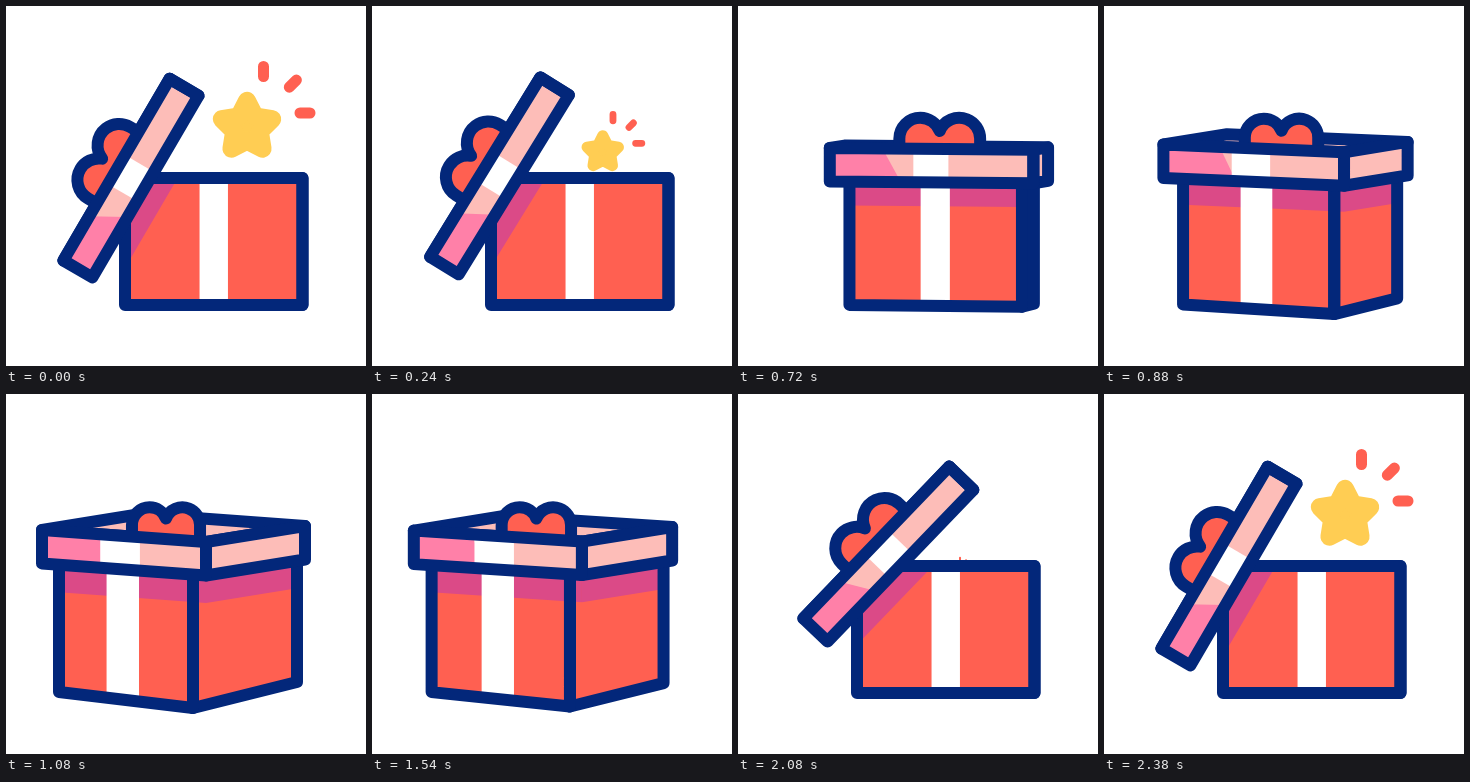
Write an HTML page with a canvas that moves like this. It is 360 by 360 pixels and loops after 2400 ms.

```html
<!DOCTYPE html>
<html lang="en">
<head>
<meta charset="utf-8">
<title>Gift box</title>
<style>
html, body { margin: 0; width: 100%; height: 100%; overflow: hidden; background: #fff; }
canvas { display: block; width: 360px; height: 360px; }
</style>
</head>
<body>
<canvas id="stage" width="360" height="360"></canvas>
<script>
const ctx = document.getElementById('stage').getContext('2d');
const LOOP = 2400;
const NAVY = '#03277a', RED = '#ff6051', BLUSH = '#fdbdb8', PINK = '#ff80a8',
      SHADE = '#db4a87', YELLOW = '#ffcd53', WHITE = '#fff';

// Extent from the front; turned = x and drop of the left, middle and right edges.
const box = { left: 119, right: 296.5, top: 172, bottom: 299, turned: [[53, -1], [187, 15], [291, -11]] };
const lid = { left: 101.5, right: 312, top: 143, bottom: 176.5, turned: [[36, -7], [200, 5], [299, -11]] };

const lerp = (a, b, k) => a + (b - a) * k;
const span = (t, a, b) => Math.min(1, Math.max(0, (t - a) / (b - a)));
const sine = k => (1 - Math.cos(Math.PI * k)) / 2;
const outCubic = k => 1 - (1 - k) ** 3;

// s runs 0..1 across the front and 1..2 along the side.
function at(part, s, y, turn) {
  const i = s > 1 ? 1 : 0;
  const [[xa, da], [xb, db]] = part.turned.slice(i);
  const flat = lerp(part.left, part.right, Math.min(s, 1));
  return [lerp(flat, lerp(xa, xb, s - i), turn), y + turn * lerp(da, db, s - i)];
}

function band(part, turn, s0, s1, top = part.top, bottom = part.bottom, slant = 0) {
  return [at(part, s0, top, turn), at(part, s1, top, turn),
          at(part, s1 + slant, bottom, turn), at(part, s0, bottom, turn)];
}

function trace(points) {
  ctx.beginPath();
  for (const [x, y] of points) ctx.lineTo(x, y);
  ctx.closePath();
}

function fill(points, color) {
  trace(points);
  ctx.fillStyle = color;
  ctx.fill();
}

function outline(points) {
  trace(points);
  ctx.stroke();
}

// The lid tips off to the left along a shallow arc.
function placeLid(shut, hop) {
  const x = lerp(125.3, 207, shut + 0.477 * shut * (1 - shut));
  const y = lerp(172, 160, shut) - hop * Math.sin(Math.PI * shut ** 1.1);
  ctx.translate(x, y);
  ctx.rotate(-59.7 * (1 - shut) * Math.PI / 180);
  ctx.translate(-207, -160);
}

function drawStar(size) {
  if (size <= 0) return;
  ctx.save();
  ctx.translate(214, 187);
  ctx.scale(size, size);
  ctx.translate(-214, -187);
  ctx.beginPath();
  for (let i = 0; i < 10; i++) {
    const r = i % 2 ? 13.5 : 26.5, a = i * Math.PI / 5;
    ctx.lineTo(241 + r * Math.sin(a), 121.3 - r * Math.cos(a));
  }
  ctx.closePath();
  ctx.fillStyle = ctx.strokeStyle = YELLOW;
  ctx.lineWidth = 18;
  ctx.fill();
  ctx.stroke();

  // Three sparks fan out over a quarter circle.
  ctx.beginPath();
  for (let i = 0; i < 3; i++) {
    const sin = Math.sin(i * Math.PI / 4), cos = Math.cos(i * Math.PI / 4);
    ctx.moveTo(257.5 + 36.5 * sin, 107 - 36.5 * cos);
    ctx.lineTo(257.5 + 46.5 * sin, 107 - 46.5 * cos);
  }
  ctx.strokeStyle = RED;
  ctx.lineWidth = 11;
  ctx.lineCap = 'round';
  ctx.stroke();
  ctx.restore();
}

function ribbon(part, turn) {
  return band(part, turn, lerp(0.42, 0.355, turn), lerp(0.58, 0.597, turn));
}

function drawBox(turn, lidTurn, shut, hop) {
  const top = box.top - 12 * turn; // stays tucked under the lid
  const faces = [band(box, turn, 1, 2, top), band(box, turn, 0, 1, top)];
  for (const face of faces) {
    fill(face, RED);
    ctx.save();
    trace(face);
    ctx.clip();
    placeLid(shut, hop);
    for (const s of [0, 1]) fill(band(lid, lidTurn, s, s + 1, lid.top, 200 + 4 * turn), SHADE);
    ctx.restore();
  }
  fill(ribbon(box, turn), WHITE);
  faces.forEach(outline);
}

function drawHeart(turn) {
  const x = lerp(209, 160, turn), y = lerp(133, 131, turn), s = lerp(1, 0.82, turn);
  const gap = 20 * s, r = 21.5 * s, notch = Math.acos(gap / r);
  ctx.beginPath();
  ctx.moveTo(x - gap - r, 152);
  ctx.arc(x - gap, y, r, Math.PI, -notch);
  ctx.arc(x + gap, y, r, Math.PI + notch, 2 * Math.PI);
  ctx.lineTo(x + gap + r, 152);
  ctx.fillStyle = RED;
  ctx.fill();
  ctx.stroke();
}

function drawLid(turn, shut, hop) {
  const [left, mid, right] = [0, 1, 2].map(s => at(lid, s, lid.top, turn));
  const back = left.map((v, i) => v + right[i] - mid[i]);
  const top = [left, back, right, mid];
  const side = band(lid, turn, 1, 2), front = band(lid, turn, 0, 1);
  ctx.save();
  placeLid(shut, hop);
  fill(top, BLUSH);
  outline(top);
  drawHeart(turn);
  fill(side, BLUSH);
  fill(front, BLUSH);
  fill(band(lid, turn, 0, lerp(0.243, 0.35, turn), lid.top, lid.bottom, 0.09), PINK);
  fill(ribbon(lid, turn), WHITE);
  outline(side);
  outline(front);
  ctx.restore();
}

function draw(t) {
  const closing = t < 1460;
  const shut = closing ? sine(span(t, 200, 640)) : 1 - outCubic(span(t, 1890, 2380));
  const hop = closing ? 42 : 16;
  const turn = closing ? sine(span(t, 620, 1080)) : 1 - sine(span(t, 1460, 1855));
  const lidTurn = turn ** 0.88;
  const star = closing ? 1 - span(t, 50, 360) ** 2 : outCubic(span(t, 2060, 2380));

  ctx.fillStyle = WHITE;
  ctx.fillRect(0, 0, 360, 360);
  ctx.lineJoin = 'round';
  drawStar(star);
  ctx.strokeStyle = NAVY;
  ctx.lineWidth = 12;
  drawBox(turn, lidTurn, shut, hop);
  drawLid(lidTurn, shut, hop);
}

const start = performance.now();
function tick() {
  draw((performance.now() - start) % LOOP);
  requestAnimationFrame(tick);
}
tick();
</script>
</body>
</html>
```
